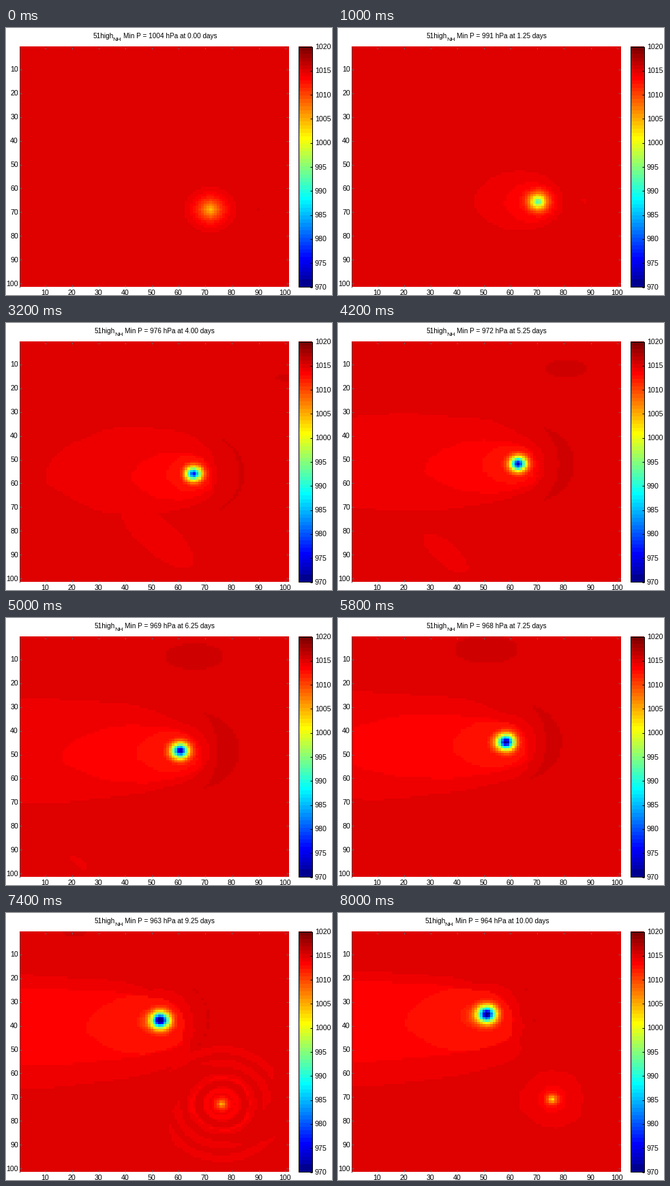
Recreate the animation shown at these times as a matplotlib script. Size 478 by 392 pixels, loop 8200 ms.

```python
import numpy as np
import matplotlib.pyplot as plt
from matplotlib.animation import FuncAnimation
from matplotlib.colors import ListedColormap

W, H, DPI = 478, 392, 100
X0, X1, Y0, Y1 = 20, 415, 27, 380
BAR0, BAR1 = 429, 449
N = 101
FRAMES, STEP = 41, 200
BASE, LOW, HIGH = 1015, 970, 1020

plt.rcParams["font.family"] = "Liberation Sans"
rng = np.random.default_rng(5)

# 64-step jet
i = np.arange(1, 65) / 16
jet = ListedColormap(np.clip(np.c_[
    np.minimum(i - 1.5, 4.5 - i),
    np.minimum(i - 0.5, 3.5 - i),
    np.minimum(i + 0.5, 2.5 - i)], 0, 1))

GX, GY = np.meshgrid(np.arange(1, N + 1), np.arange(1, N + 1))

# plume outlines, from outermost inwards: pressure drop, then at each of
# PLUME_DAYS the half length, half height, reach ahead and southward shift
PLUME_DAYS = [0, 4, 6.25, 10]
PLUMES = [
    (0.6, [9.7, 32, 70, 70], [9.7, 18.5, 22, 24], [9.7, 10, 11, 17], [0, -1, 0, 6]),
    (1.4, [7.5, 15, 26, 70], [7.5, 10, 12, 17], [7.5, 7.5, 9, 13], [0, 1, 1.5, 3]),
    (2.2, [5.5, 8, 11.5, 20], [5.5, 7.5, 8.5, 13], [5.5, 6, 7, 10.5], [0, 0, 0.5, 2.5]),
]
WAVES = [(k, rng.uniform(0, 2 * np.pi)) for k in (3, 5, 8, 13)]


def key(day, days, values):
    return np.interp(day, days, values)


def bump(day, peak, width):
    return np.exp(-((day - peak) / width) ** 2)


def wobble(angle, day):
    """Ragged outline that grows from a clean circle."""
    rough = 0.1 * min(day / 3, 1)
    return 1 + rough * sum(np.sin(k * angle + p) / k for k, p in WAVES)


def ellipse(x, y, a, b, tilt=0):
    c, s = np.cos(tilt), np.sin(tilt)
    return np.hypot((x * c + y * s) / a, (y * c - x * s) / b) < 1


def lowest(day):
    return key(day, [0, 2.25, 4, 6.25, 8.25, 9.25, 10],
               [1004, 981, 976, 969, 966, 963, 964])


def main_offset(day):
    days = [0, 2.25, 4, 6.25, 8.25, 10]
    return (GX - key(day, days, [72, 69, 65.8, 60.7, 56, 51.2]),
            GY - key(day, days, [69, 63, 56.1, 48.5, 41.2, 35.2]))


def main_storm(day, dx, dy):
    days = [0, 2.25, 4, 10]
    size = key(day, days, [4.27, 2.3, 2.7, 3])
    power = key(day, days, [1.4, 1.3, 1.6, 1.65])
    glow = 0.8 * day
    wide = np.where(dx < 0, 4 + 0.55 * day, 4.5)
    halo = glow * np.exp(-np.hypot(dx / wide, (dy - 0.1 * day) / 5))
    core = np.exp(-(np.hypot(dx, dy) / size) ** power)
    return (BASE - lowest(day) - glow) * core + halo


def plume(day, dx, dy, curves):
    a, b, ahead, shift = (key(day, PLUME_DAYS, c) for c in curves)
    x, y = (dx + a - ahead) / a, (dy - shift) / b
    return np.hypot(x, y) < wobble(np.arctan2(y, x), day)


def trailing_band(day):
    grow = bump(day, 4, 1.8)
    x, y = 52 - 13 * (day - 4), 82 + 6 * (day - 4)
    return ellipse(GX - x, GY - y, 18 * grow, 7 * grow, np.pi / 4)


def raised(day, dx, dy):
    """Slightly higher pressure: a crescent ahead and a patch in the north."""
    angle = np.arctan2(dy, dx)
    thick = 4 * bump(day, 6.25, 1.8) * np.cos(1.5 * np.clip(angle, -1.05, 1.05))
    crescent = abs(np.hypot(dx, dy) - 18) < thick
    t, grow = day - 6.25, bump(day, 7, 2.5)
    patch = ellipse(GX - 66 + 15 * t, GY - 9 + 3 * t, 12 * grow, 6 * grow)
    return crescent | patch


def second_storm(day):
    """Storm depth and the rippled rings around it."""
    days = [7.5, 8.25, 9.25, 10]
    dx = GX - key(day, days, [79, 78, 76.3, 75.7])
    dy = GY - key(day, days, [79, 77, 73, 71])
    r, angle = np.hypot(dx, dy), np.arctan2(dy, dx)
    depth = key(day, days, [0, 3, 12, 14])
    core = depth * np.exp(-(r / key(day, days, [3, 3, 1.9, 1.9])) ** 1.1)
    reach = key(day, days, [0, 18, 25, 12]) * wobble(angle, day)
    ripple = np.cos(2 * np.pi * r / 5.7)
    gap = key(day, days, [-0.6, -0.6, -0.1, -1.1])
    broken = (r < 14) | (np.sin(2 * angle + 0.2 * r) > -0.3)
    rings = (r < reach) & (ripple > gap) & broken
    bright = (r < 0.45 * reach) & (ripple > gap + 0.6)
    return core, rings, bright


def pressure(day):
    dx, dy = main_offset(day)
    core, rings, bright = second_storm(day)
    drop = np.where(raised(day, dx, dy), -0.6, 0.0)
    drop[rings | trailing_band(day)] = 0.6
    drop[bright] = 1.4
    for level, *curves in PLUMES:
        inside = plume(day, dx, dy, curves)
        drop[inside] = np.maximum(drop[inside], level)
    storms = main_storm(day, dx, dy) + core
    return BASE - np.where(storms > 0.47, np.maximum(drop, storms), drop)


fig = plt.figure(figsize=(W / DPI, H / DPI), dpi=DPI, facecolor="white")
ax = fig.add_axes([0, 0, 1, 1])
ax.axis("off")


def label(x, y, s, size=10.0, **kw):
    return ax.text(x, y, s, fontsize=size * 72 / DPI, color="black",
                   va="baseline", **kw)


def line(xs, ys, color="black"):
    ax.plot(np.add(xs, 0.5), np.add(ys, 0.5), color=color,
            lw=0.72, solid_capstyle="butt", snap=True)


show = dict(cmap=jet, interpolation="nearest", aspect="auto")
image = ax.imshow(pressure(0), vmin=LOW, vmax=HIGH,
                  extent=(X0, X1, Y1, Y0), **show)
ax.imshow(np.arange(63, -1, -1)[:, None], vmin=0, vmax=64,
          extent=(BAR0, BAR1, Y1, Y0), **show)
line([X0, X0], [Y0, Y1], "0.3")
line([BAR0, BAR1, BAR1, BAR0, BAR0], [Y0, Y0, Y1 - 1, Y1 - 1, Y0])

TICK = 10.6
for v in range(10, 101, 10):
    x = X0 + (v - 0.5) * (X1 - X0) / N
    y = Y0 + (v - 0.5) * (Y1 - Y0) / N
    label(x, 392, v, TICK, ha="center")
    label(18, y + 4, v, TICK, ha="right")
    for a, b in ((Y0, Y0 + 3), (Y1 - 4, Y1 - 1)):
        line([x, x], [a, b], "0.4")
    for a, b in ((X0, X0 + 3), (X1 - 4, X1 - 1)):
        line([a, b], [y, y], "0.4")

for v in range(LOW, HIGH + 1, 5):
    y = Y1 - (v - LOW) / (HIGH - LOW) * (Y1 - Y0)
    label(453, y + 4, v, TICK)
    line([BAR1 - 3, BAR1], [y, y])

name = label(0, 15, "51high")
sub = label(0, 19, "NH", 8.5)
rest = label(0, 15, "")
ax.set_xlim(0, W)
ax.set_ylim(H, 0)


def update(n):
    day = n / 4
    text = f"Min P = {lowest(day):.0f} hPa at {day:.2f} days"
    left = 130 - 2.8 * (len(text) - len("Min P = 981 hPa at 2.25 days"))
    rest.set_text(text)
    for part, dx in ((name, 0), (sub, 29.5), (rest, 44.5)):
        part.set_x(left + dx)
    image.set_data(pressure(day))
    return image, name, sub, rest


anim = FuncAnimation(fig, update, frames=FRAMES, interval=STEP,
                     repeat=True, repeat_delay=0, blit=False)
plt.show()
```
